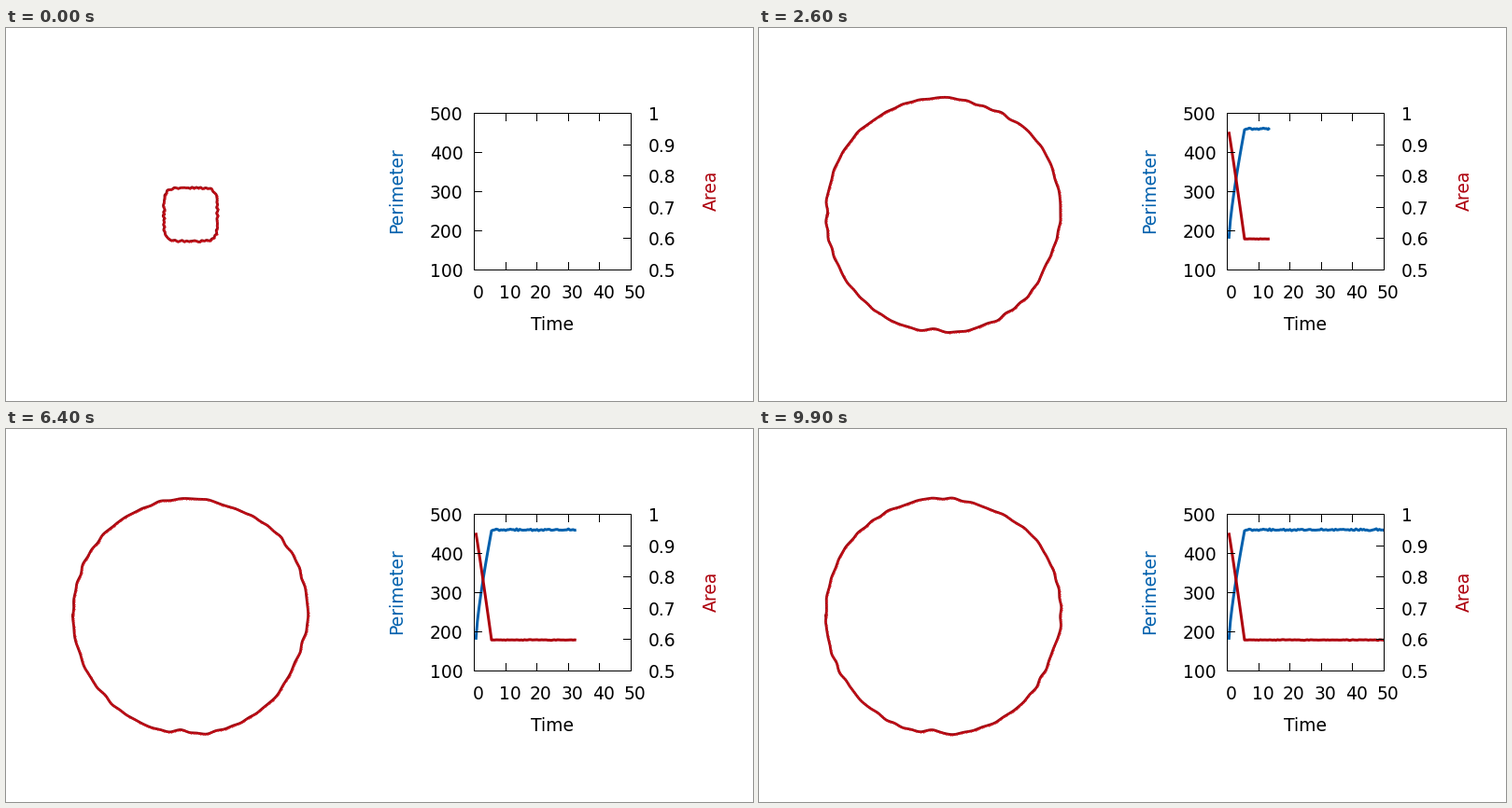
A matplotlib script for the animation above (10 s loop, 800 by 400 pixels).

```python
import numpy as np
import matplotlib.pyplot as plt
from matplotlib.animation import FuncAnimation

W, H, DPI = 800, 400, 100
FRAMES, STEP = 100, 0.5
PX = 72 / DPI
BLUE, RED = "#0060ad", "#ad000c"
CX, CY, R_END, T_FULL = 197.7, 200, 125.3, 5.5
LEFT, RIGHT, TOP, BOTTOM = 501.5, 669.5, 91.5, 259.5

plt.rcParams["font.family"] = "DejaVu Sans"
plt.rcParams["font.size"] = 18.8 * PX

fig = plt.figure(figsize=(W / DPI, H / DPI), dpi=DPI, facecolor="white")
ax = fig.add_axes([0, 0, 1, 1])
ax.set_xlim(0, W)
ax.set_ylim(H, 0)
ax.axis("off")


def time_x(t):
    return LEFT + (RIGHT - LEFT) * t / 50


def value_y(v, low, high):
    return BOTTOM - (BOTTOM - TOP) * (v - low) / (high - low)


def pixel(c):
    return np.floor(c + 1e-6) + 0.5


def segment(xs, ys):
    ax.plot(xs, ys, color="black", lw=PX, zorder=5, snap=False,
            solid_capstyle="projecting", solid_joinstyle="miter")


def label(x, y, text, ha="center", color="black", rotation=0):
    ax.text(x, y, text, ha=ha, va="baseline", color=color,
            rotation=rotation, rotation_mode="anchor")


# Chart frame, ticks and labels
segment([LEFT, RIGHT, RIGHT, LEFT, LEFT], [TOP, TOP, BOTTOM, BOTTOM, TOP])
for t in range(0, 51, 10):
    x = pixel(time_x(t))
    label(x + 4.2, 290, str(t))
    if 0 < t < 50:
        segment([x, x], [BOTTOM, BOTTOM - 8])
        segment([x, x], [TOP, TOP + 8])
for v in range(100, 501, 100):
    y = pixel(value_y(v, 100, 500))
    label(489.5, y + 7.5, str(v), "right")
    if 100 < v < 500:
        segment([LEFT, LEFT + 8], [y, y])
for k in range(5, 11):
    y = pixel(value_y(k / 10, 0.5, 1))
    label(687.5, y + 7.5, f"{k / 10:g}", "left")
    if 5 < k < 10:
        segment([RIGHT, RIGHT - 8], [y, y])
label(585, 324, "Time")
label(424, 174, "Perimeter", color=BLUE, rotation=90)
label(761, 174.5, "Area", color=RED, rotation=90)

# Measured series: growth until T_FULL, then a noisy plateau
rng = np.random.default_rng(4)
times = STEP * np.arange(1, FRAMES + 1)
growth = np.minimum((times - STEP) / (T_FULL - STEP), 1)
steady = times > T_FULL
perimeter = 180 + 278 * growth ** 0.77
perimeter[steady] = 460.5 + rng.normal(0, 1.1, steady.sum())
area = 0.941 - 0.342 * growth ** 1.05 + rng.normal(0, 0.0005, FRAMES) * steady
curve_x = time_x(times)
perimeter_y = value_y(perimeter, 100, 500)
area_y = value_y(area, 0.5, 1)

# Colony outline: rounded square, then octagon, then a rippled circle
theta = np.linspace(-np.pi, np.pi, 721)
modes = np.arange(14, 47, 3)
phases = rng.uniform(0, 2 * np.pi, modes.size)
drifts = rng.uniform(-0.7, 0.7, modes.size)


def bump(degrees, width, height):
    off = np.angle(np.exp(1j * (theta - np.radians(degrees))))
    return height * np.exp(-(off / np.radians(width)) ** 2)


# Lasting dents and bulges, clockwise from the right
DENTS = (bump(23, 14, -3.2) + bump(-70, 14, -2) + bump(-38, 16, 1.8)
         + bump(95, 5, -4) + bump(95, 36, 1.6) + bump(-143, 18, 1.5))


def superellipse(n):
    c, s = np.abs(np.cos(theta)), np.abs(np.sin(theta))
    return (c ** n + s ** n) ** (-1 / n)


def ripple(t):
    waves = np.cos(np.outer(modes, theta) + (phases + drifts * t)[:, None])
    return 0.18 * waves.sum(axis=0)


def colony(t):
    grown = min(t, T_FULL)
    size = R_END * np.sqrt(0.052 + 0.1394 * grown + 0.006 * grown ** 2)
    settle = np.clip((t - 4) / 1.5, 0, 1)
    facets = 0.016 * min(t / 4, 1) * (1 - settle) * (1 - np.cos(8 * theta))
    r = size * superellipse(2 + 3 * np.exp(-t)) * (1 + facets)
    r += settle * DENTS + ripple(t) + 0.015 * t
    return CX + r * np.cos(theta), CY + r * np.sin(theta)


def beads(x, y, gap=2.5):
    length = np.append(0, np.cumsum(np.hypot(np.diff(x), np.diff(y))))
    s = np.linspace(0, length[-1], int(length[-1] / gap), endpoint=False)
    return np.interp(s, length, x), np.interp(s, length, y)


ring, = ax.plot([], [], color="#98080f", lw=2.8 * PX)
dots, = ax.plot([], [], ls="none", marker="o", ms=2.1 * PX, mew=0,
                color="#d0101a")
blue_line, = ax.plot([], [], color=BLUE, lw=3 * PX, solid_capstyle="butt")
red_line, = ax.plot([], [], color=RED, lw=3 * PX, solid_capstyle="butt")


def update(i):
    x, y = colony(i * STEP)
    ring.set_data(x, y)
    dots.set_data(*beads(x, y))
    n = i + 1 if i else 0
    blue_line.set_data(curve_x[:n], perimeter_y[:n])
    red_line.set_data(curve_x[:n], area_y[:n])
    return ring, dots, blue_line, red_line


anim = FuncAnimation(fig, update, frames=FRAMES, interval=100,
                     repeat=True, repeat_delay=0)
plt.show()
```
